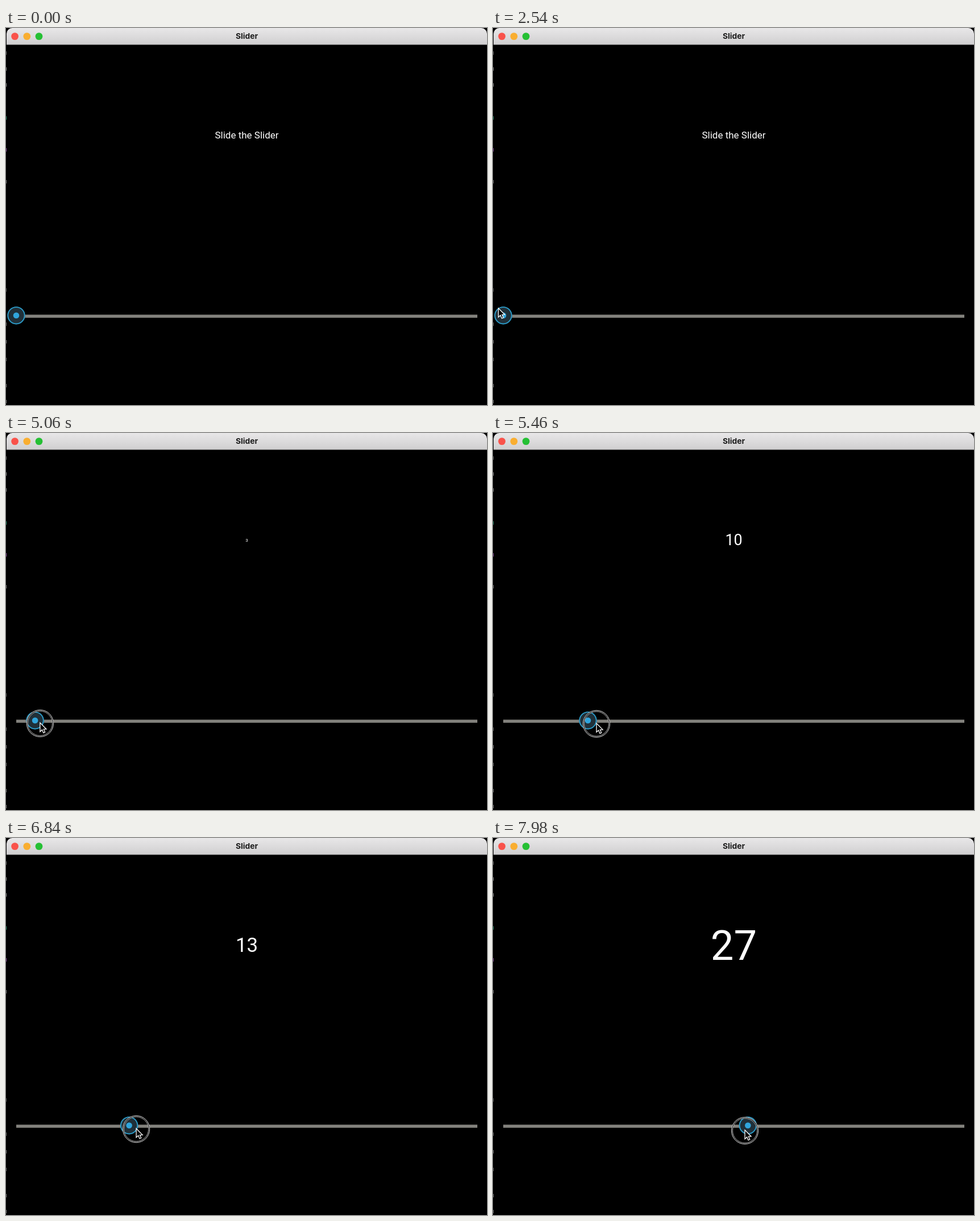
Write an HTML page with a canvas that moves like this. It is 846 px wide and 662 px high and loops after 8 s.

```html
<!DOCTYPE html>
<html lang="en">
<head>
<meta charset="utf-8">
<title>Slider</title>
<style>
  html, body { margin: 0; width: 100%; height: 100%; overflow: hidden; background: #000; }
  canvas { display: block; }
</style>
</head>
<body>
<canvas id="stage" width="846" height="662"></canvas>
<script>
const ctx = document.getElementById('stage').getContext('2d');
const W = 846, H = 662, LOOP = 8000;
const TRACK = { x0: 18, x1: 829, min: 1, max: 50 };
const STEP = (TRACK.x1 - TRACK.x0) / (TRACK.max - TRACK.min);
const ENTER = 300, PRESS = 4640, DRAG = 4810, LAG = 40;

const smooth = u => u * u * (3 - 2 * u);
const easeOut = u => 1 - (1 - u) ** 3;

// Pointer moves: start, end, from, to, easing
const moves = [
  [ENTER, 900, [786, 300], [295, 413], easeOut],
  [1680, 2420, [295, 413], [9.5, 491.5], smooth],
  [4200, 4600, [9.5, 491.5], [20, 508], smooth],
  [DRAG, 5650, [20, 508], [206, 509.3], smooth],
  [6650, 7640, [206, 509.3], [443, 512.3], smooth]
];

function pointerAt(t) {
  let move = moves[0];
  for (const m of moves) if (t >= m[0]) move = m;
  const [start, end, from, to, ease] = move;
  const k = ease(Math.min(1, Math.max(0, (t - start) / (end - start))));
  return from.map((a, i) => a + (to[i] - a) * k);
}

function valueAt(t) {
  if (t < DRAG) return TRACK.min;
  const x = pointerAt(t - LAG)[0];
  return Math.max(TRACK.min, Math.round(TRACK.min + (x - TRACK.x0) / STEP));
}

function disc(x, y, r, fill) {
  ctx.beginPath();
  ctx.arc(x, y, r, 0, Math.PI * 2);
  ctx.fillStyle = fill;
  ctx.fill();
}

function ring(x, y, r, width, color) {
  ctx.beginPath();
  ctx.arc(x, y, r, 0, Math.PI * 2);
  ctx.lineWidth = width;
  ctx.strokeStyle = color;
  ctx.stroke();
}

function label(text, x, y, font, color) {
  ctx.font = font;
  ctx.fillStyle = color;
  ctx.textAlign = 'center';
  ctx.fillText(text, x, y);
}

function drawWindow() {
  ctx.fillStyle = '#000';
  ctx.fillRect(0, 0, W, H);

  // Slivers of what lies behind the left edge
  const specks = [[44, '#666'], [72, '#888'], [100, '#888'], [158, '#2a8a68'], [214, '#8a4a9a'],
    [270, '#777'], [460, '#555'], [520, '#666'], [551, '#777'], [582, '#666'], [628, '#777'], [656, '#777']];
  for (const [y, color] of specks) {
    ctx.fillStyle = color;
    ctx.fillRect(0, y - 3, 1, 6);
  }

  const bar = ctx.createLinearGradient(0, 0, 0, 29);
  bar.addColorStop(0, '#e8e7e8');
  bar.addColorStop(1, '#d0cfd0');
  ctx.fillStyle = bar;
  ctx.beginPath();
  ctx.roundRect(1, 0, 845, 29, [10, 10, 0, 0]);
  ctx.fill();
  ctx.fillStyle = '#b4b3b4';
  ctx.fillRect(1, 28.5, 845, 1);

  ['#f9524a', '#f9ae30', '#25c034'].forEach((color, i) => {
    disc(15.6 + 21.2 * i, 14.6, 6.4, color);
  });
  label('Slider', 423.5, 19, '700 13.8px Inter, sans-serif', '#1c1c1c');
}

function drawSlider(value) {
  ctx.fillStyle = '#83827d';
  ctx.fillRect(TRACK.x0, 503.4, TRACK.x1 - TRACK.x0, 5.4);
  const x = TRACK.x0 + (value - TRACK.min) * STEP, y = 504.8;
  disc(x, y, 15.6, '#203039');
  ring(x, y, 14.7, 1.9, '#2b9cca');
  disc(x, y, 5.3, '#30a5dc');
}

function drawText(value) {
  const moved = value > TRACK.min;
  const size = moved ? value * 2.68 : 17;
  label(moved ? String(value) : 'Slide the Slider', 423.5, 187.8 + size * 0.3555,
    `${size}px Roboto, sans-serif`, '#fff');
}

function drawPointer(x, y, pressed) {
  if (pressed) {
    ring(x, y + 1.6, 22.7, 2, '#111');
    ring(x, y + 1.6, 23.6, 1, '#d8d8d8');
    ring(x, y + 1.6, 21.6, 0.9, '#c0c0c0');
  }
  ctx.save();
  ctx.translate(x, y);
  ctx.beginPath();
  const outline = [[0, 0.6], [0, 16.2], [3.6, 12.9], [6, 18.4], [8.7, 17.2], [6.4, 11.9], [11, 11.7]];
  for (const p of outline) ctx.lineTo(...p);
  ctx.closePath();
  ctx.fillStyle = '#000';
  ctx.fill();
  ctx.lineWidth = 1.3;
  ctx.lineJoin = 'miter';
  ctx.strokeStyle = '#fff';
  ctx.stroke();
  ctx.restore();
}

function draw(t) {
  const value = valueAt(t);
  drawWindow();
  drawText(value);
  drawSlider(value);
  if (t >= ENTER) drawPointer(...pointerAt(t), t >= PRESS);
}

const began = performance.now();
function tick() {
  draw((performance.now() - began) % LOOP);
  requestAnimationFrame(tick);
}
tick();
</script>
</body>
</html>
```
